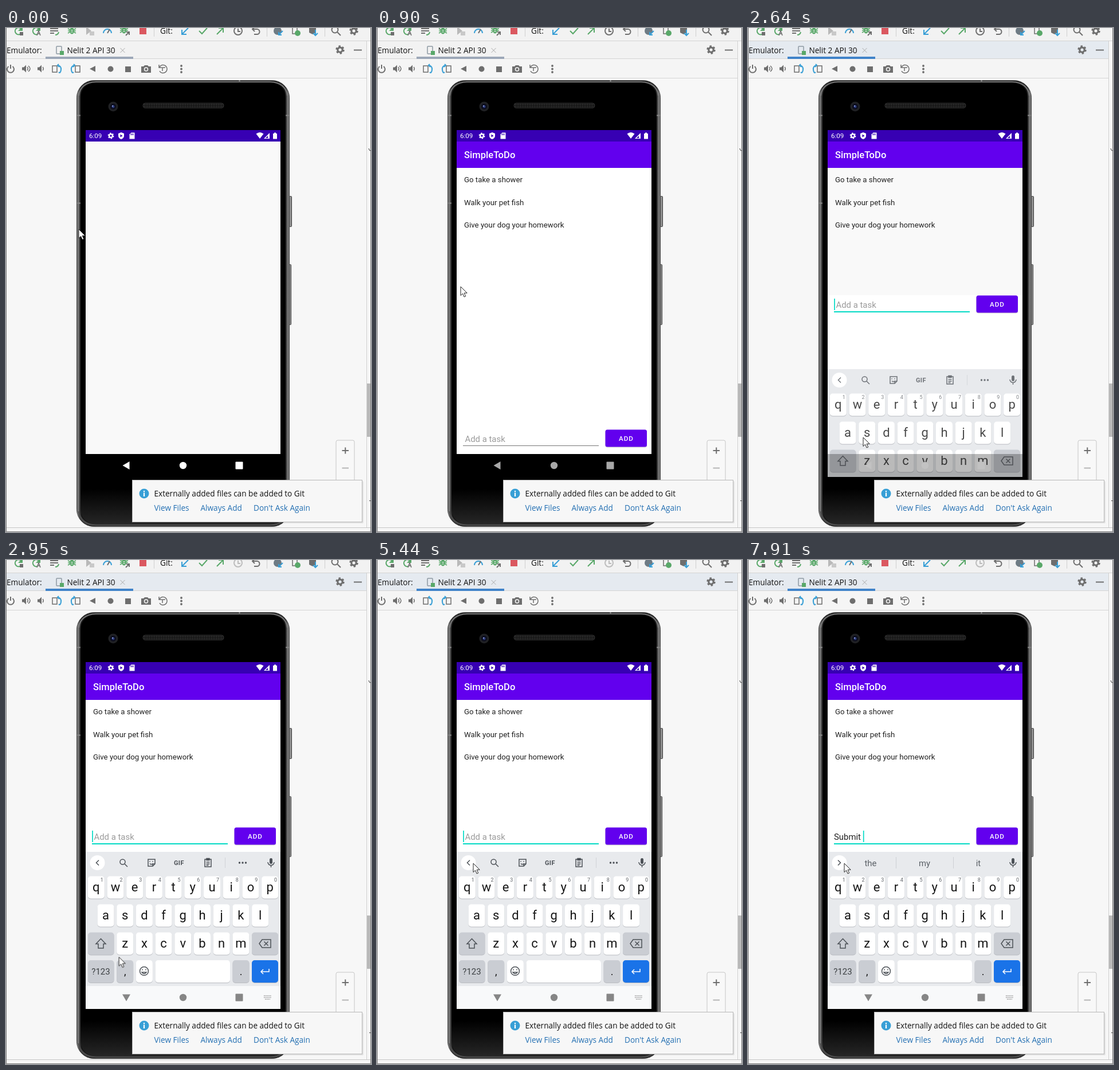
Recreate the animation shown at these times as an HTML page. Size 637 px wide and 879 px high, loop 8000 ms.

```html
<!DOCTYPE html>
<html lang="en">
<head>
<meta charset="utf-8">
<title>Task list on an emulator</title>
<style>
html, body { margin: 0; height: 100%; overflow: hidden; background: #f7f7f7; }
svg { display: block; width: 637px; height: 879px; }
text { white-space: pre; }
.ide { font: 13.6px "Open Sans", "Noto Sans", sans-serif; fill: #111; }
.app { font: 13.25px Roboto, sans-serif; fill: #212121; }
.mid { text-anchor: middle; }
.line { fill: none; stroke: #6e6e6e; stroke-width: 2; }
.thin { stroke-width: 1.5; }
.green { stroke: #59a869; }
.blue { stroke: #389fd6; }
.solid { fill: #6e6e6e; }
.glyph { fill: none; stroke: #4c5157; stroke-width: 1.5; }
.field { font-size: 14.9px; }

.head, .under, .clock, .screen, .list, .entry, .rule, .keys, .ink, .shade, .nav, .back, .pointer {
  animation: 8s step-end infinite;
}
.head { animation-name: head; }
.under { animation-name: under; }
.clock { animation-name: clock; }
.screen { animation-name: screen; }
.list { animation-name: list; }
.entry { animation-name: entry; }
.rule { animation-name: rule; }
.keys { animation-name: keys; }
.ink { animation-name: ink; }
.shade { animation-name: shade; }
.nav { animation-name: nav; animation-timing-function: linear; }
.back { animation-name: back; }
.pointer { animation-name: pointer; animation-timing-function: linear; }

@keyframes head { 0% { fill: #f2f2f2 } 29.625%, 100% { fill: #e5eaf0 } }
@keyframes under { 0% { fill: #9ca7b8 } 29.625%, 100% { fill: #4083c9 } }
@keyframes clock { 0% { stroke: #6e6e6e } 34.75%, 100% { stroke: #bdbdbd } }
@keyframes screen { 0% { opacity: 0 } 3.75%, 100% { opacity: 1 } }
@keyframes list { 0% { fill: #fff } 31.125% { fill: #f9f9f9 } 36.25%, 100% { fill: #fff } }
@keyframes entry { 0% { transform: none } 31.125%, 100% { transform: translateY(-234px) } }
@keyframes rule {
  0% { fill: #777; height: 1px }
  31.125%, 100% { fill: #03dac5; height: 2px }
}
@keyframes keys {
  0% { transform: translateY(300px) }
  31.125% { transform: translateY(190px) }
  33% { transform: translateY(86px) }
  34.75% { transform: translateY(20px) }
  36.25%, 100% { transform: none }
}
@keyframes ink { 0% { opacity: .78 } 36.25%, 100% { opacity: 1 } }
@keyframes shade {
  0% { opacity: 1 }
  31.125% { opacity: .6 }
  33% { opacity: .27 }
  34.75% { opacity: .1 }
  36.25%, 100% { opacity: 0 }
}
@keyframes nav {
  0%, 5.6% { fill: #fff }
  11.25% { fill: #a8a8a8 }
  14.625%, 31.125% { fill: #9b9b9b }
  33%, 34.75% { fill: #c2c2c2 }
  36.25%, 100% { fill: #868686 }
}
@keyframes back { 0% { transform: none } 36.25%, 100% { transform: rotate(-90deg) } }
@keyframes pointer {
  0%, 1.875% { transform: translate(127px, 351px) }
  5.6% { transform: translate(122px, 375px) }
  11.25%, 12.75% { transform: translate(146px, 451px) }
  14.625%, 18% { transform: translate(147px, 470px); animation-timing-function: ease-in-out }
  27.75% { transform: translate(202px, 713px) }
  29.625%, 34.75% { transform: translate(201px, 714px); animation-timing-function: ease-in-out }
  43.75%, 100% { transform: translate(168px, 529px) }
}
</style>
</head>
<body>
<svg viewBox="0 0 637 879">
  <defs>
    <linearGradient id="metal">
      <stop offset="0" stop-color="#3c3c3c"/><stop offset=".006" stop-color="#8a8a8a"/>
      <stop offset=".012" stop-color="#4a4a4a"/><stop offset=".022" stop-color="#161616"/>
      <stop offset=".978" stop-color="#161616"/><stop offset=".988" stop-color="#4a4a4a"/>
      <stop offset=".994" stop-color="#8a8a8a"/><stop offset="1" stop-color="#3c3c3c"/>
    </linearGradient>
    <linearGradient id="face" x2="0" y2="1">
      <stop offset=".92"/><stop offset="1" stop-color="#262626"/>
    </linearGradient>
    <pattern id="mesh" width="3" height="3" patternUnits="userSpaceOnUse">
      <rect width="3" height="3" fill="#0c0c0c"/><circle cx="1.5" cy="1.5" r=".9" fill="#4a4a4a"/>
    </pattern>
    <clipPath id="glass"><rect x="139" y="178" width="340" height="605"/></clipPath>
    <g id="gear">
      <circle r="4.2" fill="none" stroke="currentColor" stroke-width="3.2"/>
      <circle r="6.4" fill="none" stroke="currentColor" stroke-width="2.6" stroke-dasharray="3.35"/>
    </g>
    <g id="bug">
      <ellipse rx="4" ry="5.5" fill="#59a869"/>
      <path d="M-7-4l14 8M-7 4l14-8M-7 0H7M-3-8l2 3M3-8l-2 3" stroke="#59a869" stroke-width="1.6"/>
      <path d="M-2-1h4M-2 2h4" stroke="#f2f2f2"/>
    </g>
    <g id="rerun"><path d="M4-4A6 6 0 1 0 2 6" class="line green"/><path d="M7-8v8H-1z" fill="#59a869"/></g>
    <g id="horn"><path d="M-7-2.5h3l4-4v13l-4-4h-3z" class="solid"/><path d="M2-3q2.5 3 0 6" class="line thin"/></g>
  </defs>

  <rect width="637" height="879" fill="#f7f7f7"/>

  <!-- top tool bar -->
  <rect width="637" height="22" fill="#f2f2f2"/>
  <use href="#rerun" x="22" y="5"/><rect x="24" y="7" width="6" height="6" class="solid"/>
  <use href="#rerun" x="53" y="5"/><path d="M54 13l3-8 3 8m-5-3h4" class="line thin"/>
  <path d="M77 1h14M77 5h14M77 9h7" class="line"/><path d="M92 7q-1 5-6 5" class="line green"/>
  <use href="#bug" x="115" y="5"/>
  <path d="M140-2v14l9-7z" fill="#b9b9b9"/><rect x="146" y="6" width="8" height="7" fill="#c8c8c8"/>
  <path d="M170 9a7 7 0 0 1 14 0" class="line blue"/><path d="M177 9l4-7" class="line"/>
  <use href="#bug" x="206" y="4"/><path d="M209 13l6-6m-5 0h5v5" class="line"/>
  <rect x="233" y="-1" width="12" height="12" fill="#db5860"/>
  <path d="M258.5 0v15M455.5 0v15M556.5 0v15" stroke="#cfcfcf"/>
  <text x="269" y="10" class="ide">Git:</text>
  <path d="M318 0l-11 11m0-8v8h8" class="line blue"/>
  <path d="M337 5l5 5 9-10" class="line green"/>
  <path d="M368 11l11-11m-8 0h8v8" class="line green"/>
  <g class="line clock"><circle cx="405" cy="5" r="7"/><path d="M405 1v5h4"/></g>
  <path d="M434-2l-4 4 4 4m-4-4h8a4.5 4.5 0 0 1 0 9h-5" class="line"/>
  <circle cx="474" cy="5" r="7" fill="#6e7b84"/><path d="M483 5l-7 7m0-5v5h5" class="line blue"/>
  <rect x="500" y="-4" width="8" height="14" class="line thin"/><circle cx="509" cy="9" r="5" fill="#59a869"/>
  <path d="M529 0l6-3 6 3v8l-6 3-6-3z" class="solid"/><path d="M540 3v10m-4-4l4 4 4-4" class="line blue"/>
  <circle cx="574" cy="3" r="5.5" class="line"/><path d="M578 7l6 6" class="line"/>
  <use href="#gear" x="607" y="5" color="#6e6e6e"/>

  <!-- emulator header -->
  <rect y="22" width="630" height="32" class="head"/>
  <path d="M0 22.5h637M0 53.5h630" stroke="#d4d4d4"/>
  <rect x="69" y="50" width="153" height="4" class="under"/>
  <text x="1" y="43.5" class="ide">Emulator:</text>
  <rect x="88" y="32" width="9" height="13" rx="1" class="line thin" style="stroke:#8d99a3"/>
  <rect x="94" y="40" width="7" height="7" fill="#59a869"/>
  <text x="106.5" y="43.5" class="ide">Nelit 2 API 30</text>
  <path d="M199.5 35l8 8m0-8l-8 8" stroke="#aaa"/>
  <use href="#gear" x="583" y="38" color="#6e6e6e"/>
  <path d="M607 38.5h14" class="line"/>

  <!-- device controls -->
  <rect y="54" width="630" height="33" fill="#f5f5f5"/>
  <path d="M0 87.5h630" stroke="#d4d4d4"/>
  <path d="M4.5 67a6 6 0 1 0 7 0M8 64v7" class="line"/>
  <use href="#horn" x="35" y="71"/><path d="M39 66q6 5 0 10" class="line thin"/>
  <use href="#horn" x="62" y="71"/>
  <rect x="81" y="66" width="8" height="11" class="line thin"/>
  <path d="M90 65q7 1 6 8t-4 4m0-14l-2 2 3 3" class="line blue"/>
  <rect x="121" y="66" width="8" height="11" class="line thin"/>
  <path d="M120 65q-7 1-6 8t4 4m0-14l2 2-3 3" class="line blue"/>
  <path d="M156 66v10.5l-10-5.25z" class="solid"/>
  <circle cx="182.5" cy="71.5" r="5" class="solid"/><rect x="208" y="67" width="10" height="10" class="solid"/>
  <path d="M236 67h4l2-2h5l2 2h4v11h-17z" class="solid"/><circle cx="244.5" cy="72" r="3" class="line thin" style="stroke:#f5f5f5"/>
  <path d="M268 68a7 7 0 1 1 0 7M267 64v5h5M273 75v-6h5" class="line thin"/>
  <g class="solid"><circle cx="306" cy="66" r="1.9"/><circle cx="306" cy="71.5" r="1.9"/><circle cx="306" cy="77" r="1.9"/></g>

  <!-- window edges -->
  <path d="M0 871.5h637" stroke="#c4c4c4"/>
  <path d="M629.5 22v849" stroke="#d0d0d0"/>
  <rect x="630" y="620" width="7" height="93" fill="#b9b9b9"/>
  <path d="M633 210q1 5 4 4M634 824.5h3" fill="none" stroke="#333"/>
  <path d="M.5 0V878.5H636.5V0" fill="none" stroke="#777"/>

  <!-- phone -->
  <g fill="#909090" stroke="#3a3a3a">
    <rect x="494.5" y="293.5" width="4" height="53" rx="1"/>
    <rect x="494.5" y="412.5" width="3" height="105" rx="1"/>
  </g>
  <rect x="123.5" y="91.5" width="371" height="778" rx="30" fill="url(#metal)" stroke="#4b4b4b"/>
  <path d="M124 152.5h6M124 305.5h6M488 152.5h6M407.5 91v4" stroke="#888" stroke-width="2"/>
  <rect x="130" y="95" width="358" height="770" rx="26" fill="url(#face)"/>
  <path d="M127 118q3-23 30-24h304q27 1 30 24" fill="none" stroke="#777" stroke-width="2"/>
  <path d="M127 843q3 23 30 24h304q27-1 30-24" fill="none" stroke="#4a4a4a" stroke-width="3"/>
  <circle cx="187" cy="137" r="8.5" fill="#202124"/><circle cx="187" cy="137" r="5" fill="#0b0c1c"/>
  <circle cx="187" cy="137" r="2.5" fill="#2b3a78"/><circle cx="186" cy="136" r="1" fill="#a9b7ef"/>
  <rect x="239" y="131" width="141" height="8.5" rx="4" fill="url(#mesh)" stroke="#333"/>

  <g clip-path="url(#glass)">
    <rect x="139" y="198" width="340" height="545" fill="#f9f9f9"/>
    <rect x="139" y="178" width="340" height="20" fill="#3700b3"/>
    <text x="145" y="192" class="app" style="font-size:11.6px;fill:#fff">6:09</text>
    <g fill="#fff" color="#fff">
      <use href="#gear" transform="translate(183 188) scale(.7)"/>
      <path d="M201 182l5 2v4q0 4-5 6-5-2-5-6v-4z"/>
      <path d="M199.500 185.500v5l4-2.500z" fill="#3700b3"/>
      <path d="M218.500 182.500h6v11h-9v-8z"/>
      <path d="M218 184v3m2-3v3m2-3v3" stroke="#3700b3"/>
      <path d="M436.500 184.500q6.500-5 13 0l-6.500 8.500z"/>
      <path d="M460 183v10h-10z"/><path d="M457 188v4h-4z" fill="#3700b3"/>
      <path d="M466 184h2v-1.500h3v1.500h2v9.500h-7z"/>
    </g>

    <g class="screen app">
      <rect x="139" y="198" width="340" height="545" fill="#fff"/>
      <rect x="139" y="244" width="340" height="222" class="list"/>
      <rect x="139" y="198" width="340" height="46" fill="#6200ee"/>
      <text x="152" y="227" style="font-size:16.6px;font-weight:500;fill:#fff">SimpleToDo</text>
      <text x="152" y="269">Go take a shower</text>
      <text x="152" y="308.5">Walk your pet fish</text>
      <text x="152" y="348">Give your dog your homework</text>
      <g class="entry">
        <rect x="150" y="728" width="237" height="1" class="rule"/>
        <text id="hint" x="153.5" y="722" class="field" fill="#9b9b9b">Add a task</text>
        <text id="typed" x="150" y="722" class="field" fill="#212121"></text>
        <rect id="mark" x="150" y="723.5" height="1" fill="#212121"/>
        <rect id="caret" y="706" width="1.7" height="20" fill="#03dac5"/>
        <rect x="398.5" y="701.5" width="72.5" height="30" rx="3.5" fill="#000" opacity=".2"/>
        <rect x="398.5" y="700.5" width="72.5" height="30" rx="3.5" fill="#6200ee"/>
        <text x="422" y="719.5" style="font-size:11.6px;font-weight:500;letter-spacing:1px;fill:#fff">ADD</text>
      </g>
    </g>

    <g class="keys app">
      <rect x="139" y="509" width="340" height="235" fill="#e8eaed"/>
      <rect x="139" y="743" width="340" height="40" fill="#f8f9fa"/>
      <g id="caps"></g>
      <circle cx="159.5" cy="528" r="13" fill="#fff"/>
      <g class="ink">
        <path id="chevron" class="glyph"/>
        <g id="tools">
          <g class="glyph">
            <circle cx="203.5" cy="526.5" r="4.5"/><path d="M207 530l5 5"/>
            <path d="M248 522h12v8l-4 4h-8zM260 530h-4v4M251 525v1.500m5-1.500v1.500m-5 3q2.500 2.500 5 0"/>
            <path d="M347 522h11v13h-11zM350 520.500h5v3h-5zM349.500 527h6m-6 3h6m-6 2.500h4"/>
          </g>
          <text x="302" y="532" class="mid" style="font-size:11px;font-weight:700;letter-spacing:.5px;fill:#4c5157">GIF</text>
          <path d="M382.5 519v18" stroke="#d0d3d7"/>
          <g fill="#4c5157"><circle cx="407.5" cy="528" r="1.7"/><circle cx="413" cy="528" r="1.7"/><circle cx="418.5" cy="528" r="1.7"/></g>
        </g>
        <g id="words" class="mid field" style="fill:#5a6066">
          <text x="214" y="533.5"></text><text x="308" y="533.5"></text><text x="402" y="533.5"></text>
          <path d="M258.5 518v20M358.5 518v20" stroke="#cdd0d4"/>
        </g>
        <rect x="460" y="520" width="5" height="10" rx="2.5" fill="#4c5157"/>
        <path d="M457 527a5.5 5.5 0 0 0 11 0M462.5 532.5v3.5" class="glyph"/>
        <g id="letters" class="mid"></g>
        <path d="M165.5 660.5l8.500 9h-4v7.500h-9v-7.500h-4z" class="glyph"/>
        <path d="M442 669l5-7h15v14h-15zM450.500 665.500l7 7m0-7l-7 7" class="glyph"/>
        <g class="glyph"><circle cx="241" cy="717" r="7.5"/><path d="M237 719q4 5 8 0zM238 713.5v2m6-2v2"/></g>
        <path d="M459 713v5h-14m4-4l-4 4 4 4" class="glyph" style="stroke:#fff"/>
      </g>
    </g>
    <rect x="139" y="743" width="340" height="40" class="shade"/>
  </g>

  <g class="nav">
    <g transform="translate(210 763)"><path d="M5.500-7V7L-6.500 0z" class="back"/></g>
    <circle cx="309" cy="763" r="6.2"/><rect x="400.5" y="756.5" width="13" height="13" rx="1"/>
    <g class="keys" clip-path="url(#glass)">
      <path d="M450 760h13M450 763h13M452 766h9" stroke="#999" stroke-width="1.5" stroke-dasharray="1.7 1"/>
    </g>
  </g>

  <!-- zoom panel and notice -->
  <rect x="576" y="719" width="32" height="90" rx="3" fill="#f8f8f8" stroke="#c6c6c6"/>
  <path d="M586.5 737h11.500M592.250 731.500v11" class="line"/><path d="M586.5 767.5h11.500" class="line" style="stroke:#b4b4b4"/>
  <rect x="221" y="790" width="403" height="74" rx="2" fill="#000" opacity=".08"/>
  <rect x="220.5" y="788.5" width="401" height="73" fill="#f7f7f7" stroke="#b8b8b8"/>
  <circle cx="241" cy="812" r="8.5" fill="#389fd6"/>
  <path d="M241 807v2.200M241 810.500v6.500" stroke="#fff" stroke-width="2.2"/>
  <g class="ide">
    <text x="258.5" y="817">Externally added files can be added to Git</text>
    <g fill="#2470b3"><text x="258.5" y="842">View Files</text><text x="339.5" y="842">Always Add</text><text x="432" y="842">Don't Ask Again</text></g>
  </g>

  <path class="pointer" d="M0 0V15.500L3.600 12.200 6.100 18 8.700 16.900 6.200 11.200H11.200Z" fill="#fff" stroke="#222" stroke-linejoin="round"/>
</svg>

<script>
const $ = id => document.getElementById(id);
const make = (parent, tag, attrs, text = '') => {
  const el = document.createElementNS('http://www.w3.org/2000/svg', tag);
  for (const k in attrs) el.setAttribute(k, attrs[k]);
  el.textContent = text;
  parent.append(el);
};

function cap(x, y, w, fill) {
  make($('caps'), 'rect', { x, y: y + 1, width: w, height: 39, rx: 5, fill: '#b9bcc1' });
  make($('caps'), 'rect', { x, y, width: w, height: 39, rx: 5, fill });
}
function label(x, y, size, text, fill = '#161616') {
  make($('letters'), 'text', { x, y, fill, style: `font-size:${size}px` }, text);
}

const PITCH = 33.7, GREY = '#cacdd3';
[['qwertyuiop', 157.3, 551.5], ['asdfghjkl', 174, 600.5], ['zxcvbnm', 207.7, 649.5]].forEach(([row, x0, y], r) => {
  [...row].forEach((c, i) => {
    const x = x0 + i * PITCH;
    cap(x - 14.5, y, 29, '#fff');
    label(x, y + 26, 22, c);
    if (!r) label(x + 10, y + 9.5, 9, (i + 1) % 10, '#5f6368');
  });
});
cap(143, 649.5, 45.5, GREY);
cap(429, 649.5, 46, GREY);
cap(143, 698, 45.5, GREY);
cap(193.2, 698, 29, GREY);
cap(226.9, 698, 29, '#fff');
cap(260.5, 698, 130.5, '#fff');
cap(395.5, 698, 29, GREY);
cap(429, 698, 46, '#1a73e8');
label(165.5, 722.5, 15, '?123', '#3c4043');
label(207.7, 724, 18, ',');
label(410, 724, 18, '.');

// start time, typed text, underlined letters, caret shown, suggestions
const steps = [
  [0, '', 0, 0],
  [2490, '', 0, 1],
  [3040, '', 0, 0],
  [3500, '', 0, 1],
  [3900, '', 0, 0],
  [4180, 'A', 0, 1],
  [4450, 'A', 1, 1, 'A And Another'],
  [4880, 'A', 1, 0, 'A And Another'],
  [5440, '', 0, 1],
  [5570, 'S', 0, 1],
  [5700, 'S', 1, 1, 'S So She'],
  [5830, 'Su', 1, 1, 'S So She'],
  [5960, 'Su', 2, 1, 'Su So Sun'],
  [6090, 'Sub', 3, 1, 'Sub Su Sun'],
  [6220, 'Subm', 3, 1, 'Sub Su Sun'],
  [6500, 'Submi', 4, 1, 'Subm Submit Sub'],
  [6650, 'Submit', 5, 1, 'Submi Submit Submitted'],
  [6800, 'Submit', 6, 1, 'Submit Submitted Submits'],
  [6950, 'Submit ', 0, 1, 'the my it'],
  [7480, 'Submit ', 0, 0, 'the my it'],
  [7910, 'Submit ', 0, 1, 'the my it']
];

const typed = $('typed'), words = $('words').querySelectorAll('text');
const show = (id, on) => $(id).setAttribute('visibility', on ? 'inherit' : 'hidden');

function apply([, text, marked, caret, tips]) {
  typed.textContent = text;
  const span = n => n ? typed.getSubStringLength(0, n) : 0;
  $('mark').setAttribute('width', span(marked));
  $('caret').setAttribute('x', 150.2 + span(text.length));
  show('caret', caret);
  show('hint', !text);
  show('tools', !tips);
  show('words', tips);
  $('chevron').setAttribute('d', tips ? 'M157 523.5l4.500 4.500-4.500 4.500' : 'M162 523.5l-4.500 4.500 4.500 4.500');
  (tips || '  ').split(' ').forEach((w, i) => words[i].textContent = w);
}

let start, current;
function tick(now) {
  start ??= now;
  const t = (now - start) % 8000;
  const step = steps.findLast(s => s[0] <= t) || steps[0];
  if (step !== current) apply(current = step);
  requestAnimationFrame(tick);
}
requestAnimationFrame(tick);
</script>
</body>
</html>
```
